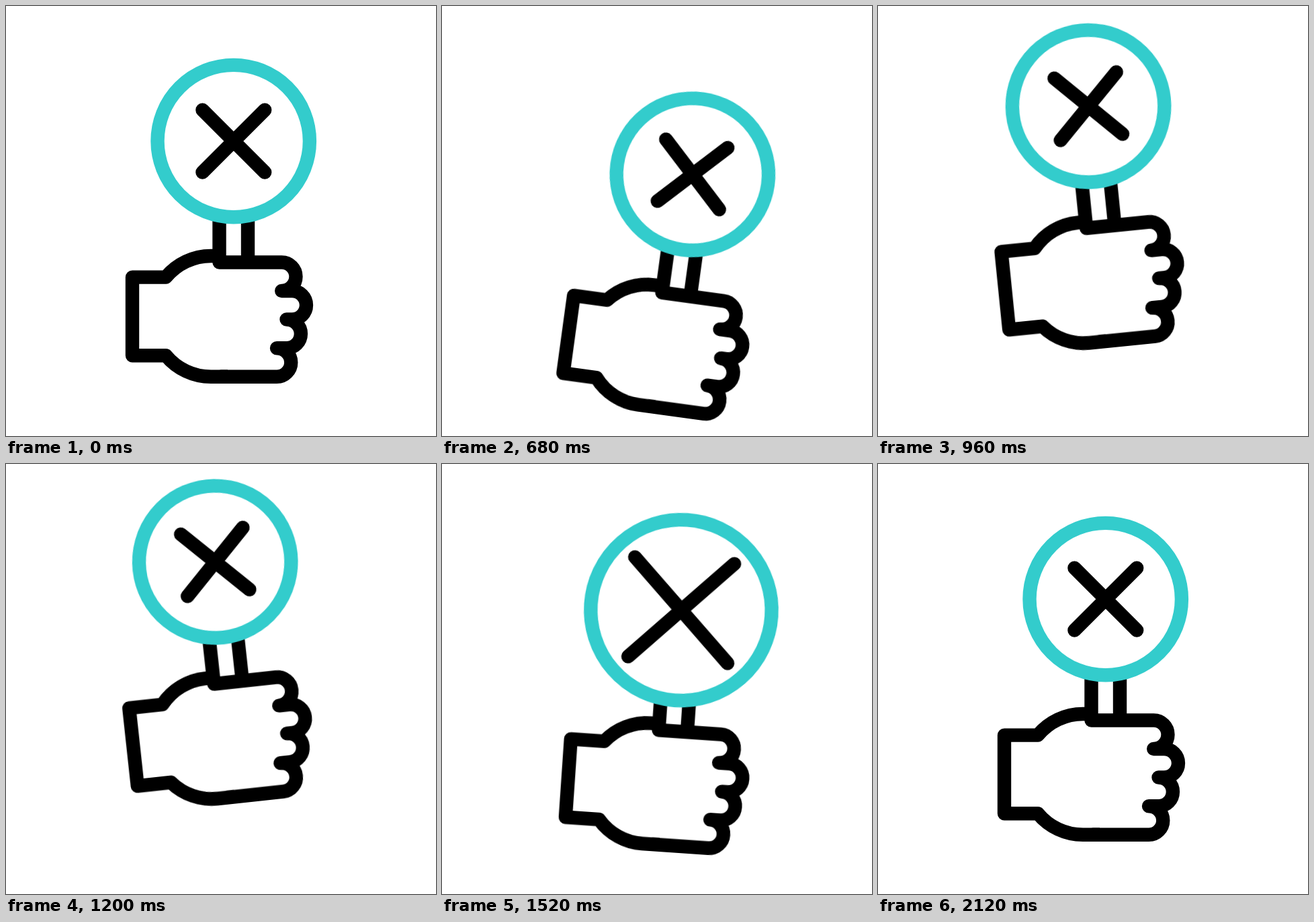
An HTML page for the animation above (2.16 s loop, 640 by 640 pixels).

```html
<!DOCTYPE html>
<html lang="en">
<head>
<meta charset="utf-8">
<title>Rejection sign</title>
<style>
  html, body { margin: 0; width: 100%; height: 100%; overflow: hidden; background: #fff; }
  svg { display: block; width: 100%; height: 100%; }

  .line {
    fill: none;
    stroke: #000;
    stroke-width: 20.4;
    stroke-linejoin: round;
    stroke-linecap: round;
  }
  .stick { stroke-linecap: butt; }
  .ring { fill: #fff; stroke: #33cccc; }
  .cross { transform-origin: 338.8px 201.1px; vector-effect: non-scaling-stroke; }
  .arm { transform-origin: 318px 455px; }

  .arm, .ring, .cross {
    animation-duration: 2160ms;
    animation-timing-function: ease-in-out;
    animation-iteration-count: infinite;
  }
  .arm { animation-name: wave; }
  .ring { animation-name: swell; }
  .cross { animation-name: grow; }

  /* Dip right, lift left, small dip, settle */
  @keyframes wave {
    0%, 7.41% { transform: translateY(0) rotate(0deg); }
    29.86% { transform: translateY(46px) rotate(8deg); }
    49.63% { transform: translateY(-67px) rotate(-8deg); }
    71.76% { transform: translateY(15px) rotate(4deg); }
    97.7%, 100% { transform: translateY(0) rotate(0deg); }
  }
  @keyframes swell {
    0%, 62.96% { r: 113.2px; }
    78.24% { r: 158px; }
    96.3%, 100% { r: 113.2px; }
  }
  @keyframes grow {
    0%, 59.26% { transform: scale(1); }
    70.83% { transform: scale(1.6); }
    92.6%, 100% { transform: scale(1); }
  }
</style>
</head>
<body>
<svg viewBox="0 0 640 640">
  <g class="arm">
    <path class="line stick" d="M317.5 290V381.5M360 290V381.5"/>
    <path class="line stick" d="M317.5 372H305A87 87 0 0 0 238 403.6H188V520.2H238A87 87 0 0 0 305 551.8H330"/>
    <path class="line" d="M317.5 381.5H410.2a21.25 21.25 0 0 1 0 42.5
      H425.7a21.25 21.25 0 0 1 0 42.5H417.5
      a21.4 21.4 0 0 1 0 42.8H403
      a21.25 21.25 0 0 1 0 42.5H320"/>
    <circle class="line ring" cx="338.7" cy="201.1" r="113.2"/>
    <path class="line cross" d="M292.4 154.7L385.2 247.5M385.2 154.7L292.4 247.5"/>
  </g>
</svg>
</body>
</html>
```
